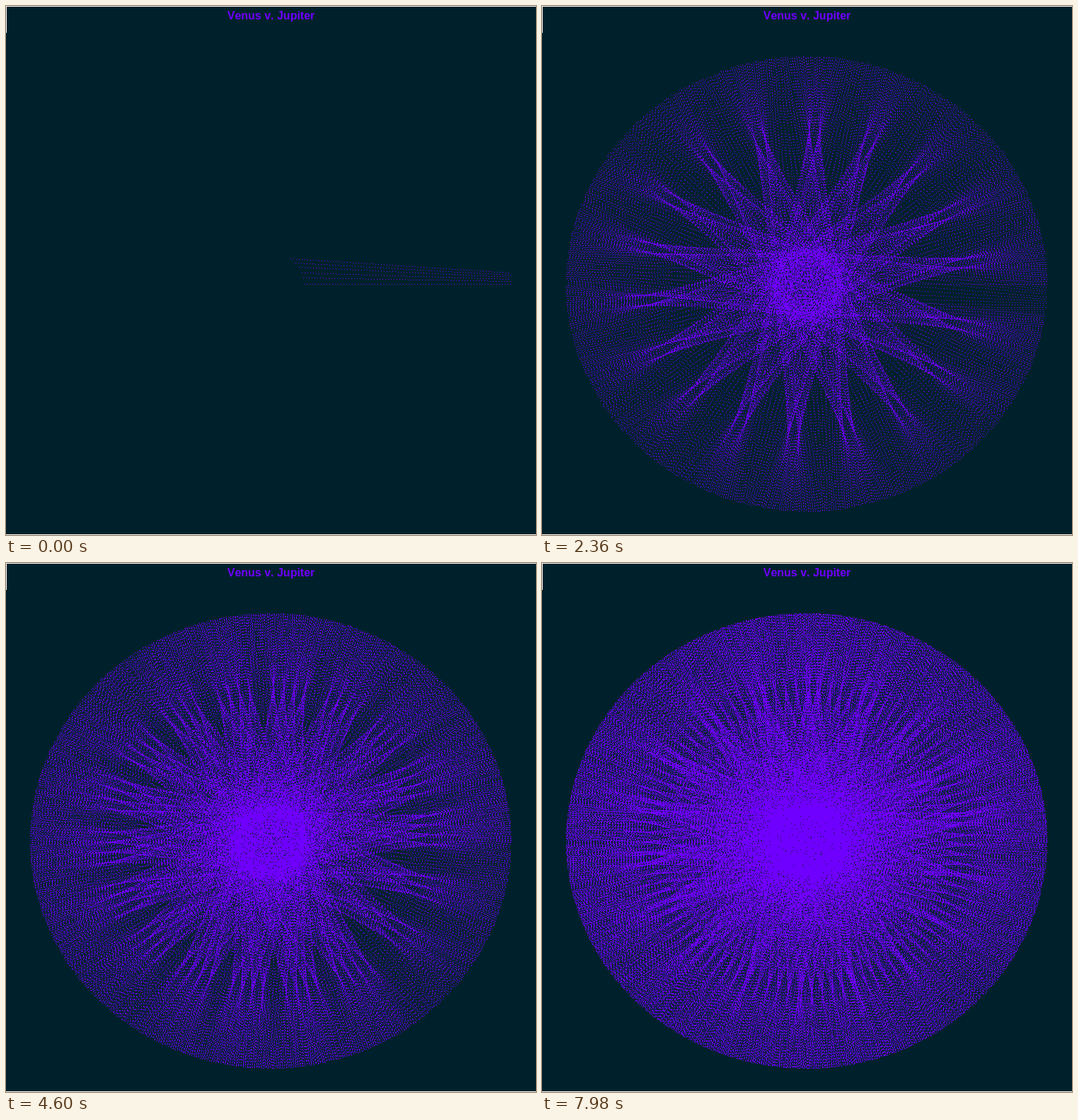
Animation of 749x748 px, one loop 8 s. Source, as an HTML page with a canvas:

```html
<!DOCTYPE html>
<html lang="en">
<head>
<meta charset="utf-8">
<title>Venus v. Jupiter</title>
<style>
  html, body { margin: 0; width: 100%; height: 100%; overflow: hidden; background: #00212b; }
  canvas { display: block; }
</style>
</head>
<body>
<canvas id="stage" width="749" height="748"></canvas>
<script>
const W = 749, H = 748;
const LOOP = 8000, STEP = 20;
const FIRST_LINES = 6, LINES_PER_STEP = 11;
const YEARS_PER_LINE = 0.018;
const DOT_GAP = 4;
const BACK = '#00212b', INK = '#6f00ff';

const CX = 373.5, CY = 392.5;
const RX = 339.5, RY = 321.5;
const JUPITER = { period: 11.86, size: 1 };
const VENUS = { period: 0.618, size: 0.723 / 5.203 };

const ctx = document.getElementById('stage').getContext('2d');
let drawn = 0;

function reset() {
  ctx.fillStyle = BACK;
  ctx.fillRect(0, 0, W, H);
  ctx.fillStyle = '#fff';
  ctx.fillRect(0, 0, W, 1);
  ctx.fillRect(0, H - 1, W, 1);
  ctx.fillRect(0, 0, 1, 38);
  ctx.fillStyle = INK;
  ctx.font = 'bold 16px "Liberation Sans", Arial, sans-serif';
  ctx.fontKerning = 'none';
  ctx.textAlign = 'center';
  ctx.fillText('Venus v. Jupiter', 374.5, 19);
  drawn = 0;
}

function position(planet, years) {
  const a = 2 * Math.PI * years / planet.period;
  return [
    Math.round(CX + RX * planet.size * Math.cos(a)),
    Math.round(CY - RY * planet.size * Math.sin(a))
  ];
}

// Dots sit on whole pixels, spaced along the longer axis, starting at Venus.
function dottedLine([x0, y0], [x1, y1]) {
  const dx = x1 - x0, dy = y1 - y0;
  const n = Math.max(Math.abs(dx), Math.abs(dy));
  for (let i = 0; i <= n; i += DOT_GAP) {
    ctx.fillRect(Math.round(x0 + dx * i / n), Math.round(y0 + dy * i / n), 1, 1);
  }
}

function render(time) {
  const step = Math.floor((time % LOOP) / STEP);
  const count = FIRST_LINES + step * LINES_PER_STEP;
  if (count < drawn) reset();
  for (; drawn < count; drawn++) {
    const years = drawn * YEARS_PER_LINE;
    dottedLine(position(VENUS, years), position(JUPITER, years));
  }
}

let start = null;
function tick(now) {
  if (start === null) start = now;
  render(Math.max(0, now - start));
  requestAnimationFrame(tick);
}

reset();
render(0);
requestAnimationFrame(tick);
</script>
</body>
</html>
```
